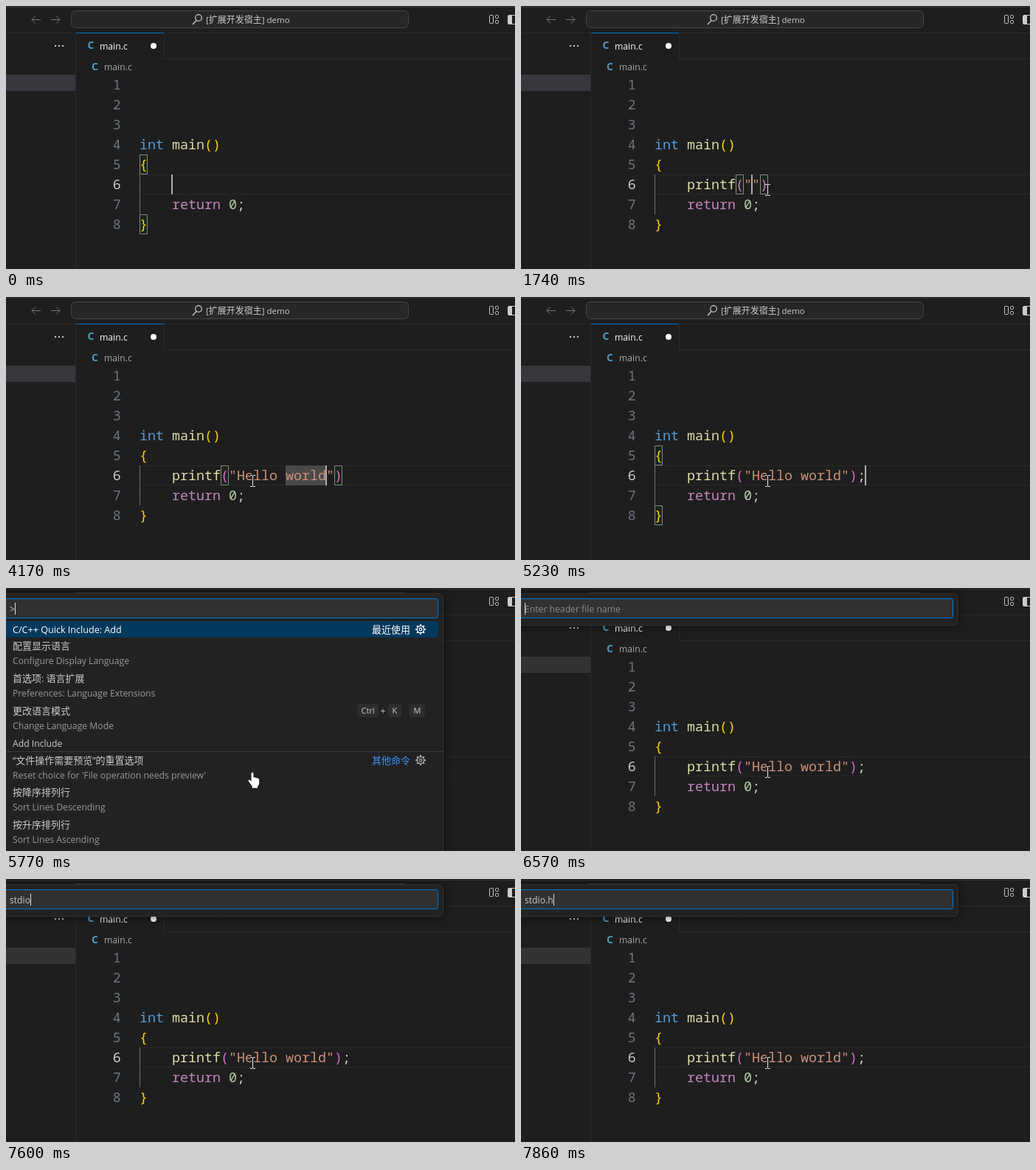
These frames come from a looping animation (690x356 px, 8000 ms). An HTML page with a canvas:

```html
<!DOCTYPE html>
<html lang="en">
<head>
<meta charset="utf-8">
<title>Editor and command palette</title>
<style>
  html, body { margin: 0; width: 690px; height: 356px; overflow: hidden; background: #1e1e1e; }
  canvas { display: block; }
</style>
</head>
<body>
<canvas width="690" height="356"></canvas>
<script>
const ctx = document.querySelector('canvas').getContext('2d');
const LOOP = 8000, CELL = 11, LEFT = 181, ROW = 27;
const PALETTE_OPEN = 5770, COMMAND_RUN = 6300;
const GREY = '#cccccc', DIM = '#9a9a9a', GOLD = '#ffd700', YELLOW = '#dcdcaa', PINK = '#da70d6';

// time, text before the caret, text after it, length of the highlighted word
const edits = [
  [0, ''], [30, 'p'], [400, 'pr'], [600, 'pr', '', 2],
  [870, 'pri'], [935, 'prin'], [1000, 'print'], [1200, 'printf'], [1400, 'printf', '', 6],
  [1640, 'printf(', ')'], [1740, 'printf("', '")'], [2080, 'printf("H', '")'],
  [2460, 'printf("He', '")'], [2550, 'printf("Hel', '")'], [2640, 'printf("Hell', '")'],
  [2720, 'printf("Hello', '")'], [2890, 'printf("Hello ', '")'], [2990, 'printf("Hello w', '")'],
  [3370, 'printf("Hello wo', '")'], [3480, 'printf("Hello wor', '")'],
  [3600, 'printf("Hello wor', '")', 3], [3840, 'printf("Hello worl', '")'],
  [3900, 'printf("Hello world', '")'], [4170, 'printf("Hello world', '")', 5],
  [4270, 'printf("Hello world"', ')'], [4590, 'printf("Hello world")'],
  [5000, 'printf("Hello world");']
];
const queries = [
  [PALETTE_OPEN, '>'], [COMMAND_RUN, ''], [6810, 's'], [6840, 'st'], [7320, 'std'],
  [7420, 'stdi'], [7550, 'stdio'], [7700, 'stdio.'], [7860, 'stdio.h']
];
const commands = [
  [78, '配置显示语言', 'Configure Display Language'],
  [122, '首选项: 语言扩展', 'Preferences: Language Extensions'],
  [166, '更改语言模式', 'Change Language Mode'],
  [210, 'Add Include'],
  [233, '“文件操作需要预览”的重置选项', "Reset choice for 'File operation needs preview'"],
  [276, '按降序排列行', 'Sort Lines Descending'],
  [320, '按升序排列行', 'Sort Lines Ascending']
];

const latest = (list, t) => list.findLast(([start]) => start <= t);

function rect(x, y, w, h, color) {
  ctx.fillStyle = color;
  ctx.fillRect(x, y, w, h);
}

function box(x, y, w, h, r, fill, stroke) {
  ctx.beginPath();
  ctx.roundRect(x, y, w, h, r);
  if (fill) { ctx.fillStyle = fill; ctx.fill(); }
  if (stroke) { ctx.strokeStyle = stroke; ctx.lineWidth = 1; ctx.stroke(); }
}

function line(points, color, width = 1) {
  ctx.beginPath();
  points.forEach(([x, y]) => ctx.lineTo(x, y));
  ctx.strokeStyle = color;
  ctx.lineWidth = width;
  ctx.stroke();
}

function disc(x, y, r, fill, stroke, width = 1.2) {
  ctx.beginPath();
  ctx.arc(x, y, r, 0, 7);
  if (fill) { ctx.fillStyle = fill; ctx.fill(); }
  if (stroke) { ctx.strokeStyle = stroke; ctx.lineWidth = width; ctx.stroke(); }
}

// Interface text around a vertical middle; returns the end position
function label(str, x, mid, color, size = 12.2, cjk = 13, weight = 400) {
  ctx.fillStyle = color;
  for (const run of str.match(/[\u4e00-\u9fff]+|[^\u4e00-\u9fff]+/g) || []) {
    ctx.font = /[\u4e00-\u9fff]/.test(run)
      ? `${cjk}px "Noto Sans CJK SC", "Noto Sans CJK", sans-serif`
      : `${weight} ${size}px "Open Sans", "Noto Sans", sans-serif`;
    ctx.fillText(run, x, mid + 4.5);
    x += ctx.measureText(run).width;
  }
  return x;
}

function code(str, col, row, color) {
  ctx.font = '18.333px "Noto Sans Mono", "DejaVu Sans Mono", monospace';
  ctx.fillStyle = color;
  ctx.fillText(str, LEFT + col * CELL, 86 + row * ROW);
}

function bracketBox(col, row) {
  box(LEFT + col * CELL + .5, 66.5 + row * ROW, 10, 26, 0, 'rgba(0,100,0,.1)', '#888888');
}

function titleBar() {
  rect(0, 1, 690, 1, '#383838');
  rect(0, 36, 690, 1, '#2b2b2b');
  for (const [x, d] of [[35, 1], [73, -1]]) {
    line([[x, 18.5], [x + 12 * d, 18.5]], '#777777');
    line([[x + 5 * d, 13.5], [x, 18.5], [x + 5 * d, 23.5]], '#777777');
  }
  box(88.5, 6.5, 457, 23, 6, '#272727', '#464646');
  disc(261, 16, 4.3, null, GREY);
  line([[258, 19.5], [253, 25]], GREY, 1.3);
  label('[扩展开发宿主] demo', 271, 18, GREY, 11.5, 12);
  box(655.5, 12.5, 5, 11, 1, null, GREY);
  box(663.5, 12.5, 4, 4, 1, null, GREY);
  box(663.5, 19.5, 4, 4, 1, null, GREY);
  box(680.5, 12.5, 14, 12, 1, null, GREY);
  rect(681, 13, 5, 11, GREY);
}

function chrome(t) {
  rect(0, 0, 690, 356, '#1e1e1e');
  titleBar();
  rect(94, 37, 1, 319, '#2b2b2b');
  rect(0, 93, 94, 22, t < PALETTE_OPEN ? '#37373d' : '#333335');
  for (const x of [66, 71, 76]) rect(x, 53, 2, 2, GREY);
  rect(214, 37, 1, 35, '#2b2b2b');
  rect(214, 71, 476, 1, '#2b2b2b');
  rect(95, 36, 119, 1, '#0078d4');
  label('C', 110.5, 53.5, '#519aba', 14, 13, 700);
  label('main.c', 127, 54, '#ffffff');
  disc(200, 54, 4, '#ffffff');
  label('C', 116, 82, '#519aba', 14, 13, 700);
  label('main.c', 133, 82, '#a9a9a9');
}

function statement(str) {
  for (const m of str.matchAll(/"[^"]*"|\w+(?=\()|\w+|[();]/g)) {
    const s = m[0];
    const color = s[0] === '"' ? '#ce9178' : /[()]/.test(s) ? PINK
      : str[m.index + s.length] === '(' ? YELLOW : '#d4d4d4';
    code(s, 4 + m.index, 6, color);
  }
}

function editor(t) {
  const [, before, after = '', marked = 0] = latest(edits, t);
  const caret = LEFT + (4 + before.length) * CELL;
  rect(LEFT, 228, 509, 1, '#292929');
  rect(LEFT, 254, 509, 1, '#292929');
  rect(LEFT, 228, 1, 54, '#707070');
  rect(caret - marked * CELL, 228, marked * CELL, ROW, '#494949');
  for (let n = 1; n < 9; n++) code(n, -3.3, n, n === 6 ? GREY : '#6e7681');

  if (t < 1640 || (t >= 5230 && t < PALETTE_OPEN)) {
    bracketBox(0, 5);
    bracketBox(0, 8);
  } else if (t < 5230) {
    bracketBox(10, 6);
    bracketBox(3 + (before + after).length - (t >= 5000), 6);
  }
  code('int', 0, 4, '#569cd6');
  code('main', 4, 4, YELLOW);
  code('()', 8, 4, GOLD);
  code('{', 0, 5, GOLD);
  statement(before + after);
  code('return', 4, 7, '#c586c0');
  code('0', 11, 7, '#b5cea8');
  code(';', 12, 7, GREY);
  code('}', 0, 8, GOLD);
  if (t < 5570) rect(caret - 1, 228, 2, ROW, '#aeafad');
}

function gear(x, y, color) {
  disc(x, y, 4.7, null, color, 1.3);
  disc(x, y, 1.8, null, color, 1.2);
  for (let i = 0; i < 8; i++) {
    const c = Math.cos(i * Math.PI / 4), s = Math.sin(i * Math.PI / 4);
    line([[x + c * 4.7, y + s * 4.7], [x + c * 6.9, y + s * 6.9]], color, 2);
  }
}

function key(str, x, w) {
  box(x, 157, w, 18, 3, '#2e2e2e');
  ctx.textAlign = 'center';
  label(str, x + w / 2, 165.5, GREY, 11);
  ctx.textAlign = 'left';
}

function commandList() {
  label('C/C++ Quick Include: Add', 9, 56, '#ffffff', 12.6);
  label('最近使用', 496, 56, '#ffffff');
  gear(562, 56, '#ffffff');
  for (const [y, name, detail = ''] of commands) {
    label(name, 9, y, GREY);
    label(detail, 9, y + 20.5, DIM);
  }
  key('Ctrl', 476, 29);
  label('+', 507.5, 166, GREY);
  key('K', 518, 18);
  key('M', 547, 21);
  rect(0, 221, 593, 1, '#3a3a3a');
  label('其他命令', 496, 233, '#3794ff');
  gear(562, 233, '#b0b0b0');
}

function palette(t) {
  const query = latest(queries, t)[1];
  const full = t < COMMAND_RUN, single = t >= 7080 && t < 7320;
  ctx.save();
  ctx.shadowColor = 'rgba(0,0,0,.6)';
  ctx.shadowBlur = 14;
  box(-20, 7, 613, full ? 400 : single ? 66 : 44, 6, '#222222');
  ctx.restore();
  box(-20.5, 7.5, 613, full ? 400 : single ? 65 : 43, 6, null, '#333333');
  box(-20.5, 14.5, 606, 26, 2, '#313131', '#0078d4');
  if (full || single) box(-20, 45, 606, 22, 3, '#04395e');
  const end = label(query, 5, 28, GREY);
  if (t >= 6570 && !query) label('Enter header file name', 5, 28, '#8a8a8a');
  rect(Math.round(end), 20, 1, 16, '#dddddd');
  if (full) commandList();
  if (single) label(query, 9, 56.5, '#2aaaff', 11.8, 13, 700);
}

function beam() {
  for (const [color, w] of [['#1e1e1e', 3], ['#f0f0f0', 1]]) {
    line([[334.5, 242], [334.5, 256]], color, w);
    for (const y of [241.5, 256.5]) {
      line([[331, y], [334, y]], color, w);
      line([[335, y], [338, y]], color, w);
    }
  }
}

function hand() {
  const p = new Path2D('M332.5 250.5q1.5-2 3 0v6q2-1.2 3 .5q1.800-.8 2.700.8q2-.5 2 1.500v5q0 2.500-2 4v2.500h-7.500v-2.200l-5-7.200q-.5-2.500 1.800-1.700l2 2z');
  ctx.fillStyle = '#ffffff';
  ctx.strokeStyle = '#111111';
  ctx.lineWidth = 1.4;
  ctx.stroke(p);
  ctx.fill(p);
}

function draw(t) {
  chrome(t);
  editor(t);
  if (t >= PALETTE_OPEN) palette(t);
  if (t >= PALETTE_OPEN && t < COMMAND_RUN) hand();
  else if (t >= 1740) beam();
}

const start = performance.now();
function tick() {
  draw((performance.now() - start) % LOOP);
  requestAnimationFrame(tick);
}
tick();
</script>
</body>
</html>
```
